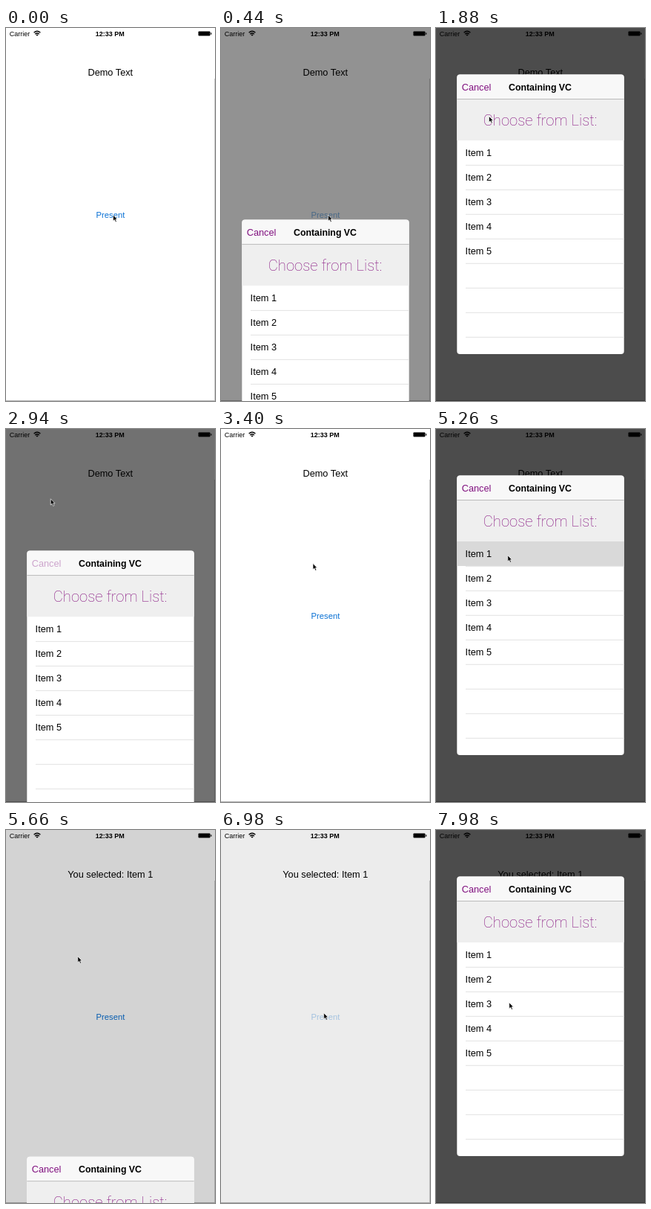
Recreate the animation shown at these times as an HTML page. Size 282 by 501 pixels, loop 8 s.

```html
<!DOCTYPE html>
<html>
<head>
<meta charset="utf-8">
<style>
html, body { margin: 0; width: 100%; height: 100%; overflow: hidden; background: #fff; }
svg { display: block; width: 100vw; height: 100vh; }
text { font: 12.75px "Liberation Sans", Arial, sans-serif; }
.mid { text-anchor: middle; }
.status { font-size: 9px; }
.bold { font-weight: bold; }
#present { font-size: 11.25px; fill: #0870d4; }
#cancel { fill: #80107f; }
.title { font-size: 12.35px; }
.prompt { font: 200 20.3px Roboto, Inter, sans-serif; fill: #85107f; }
</style>
</head>
<body>
<svg viewBox="0 0 282 501">
  <clipPath id="card"><rect x="28.3" y="62.5" width="225.4" height="375.5" rx="4"/></clipPath>
  <rect width="282" height="501" fill="#fff"/>
  <path d="M281.5 68V501" stroke="#ccc"/>
  <path d="M0 500.5H282" stroke="#b4b4b4"/>
  <text class="status" x="4.7" y="11">Carrier</text>
  <g fill="none" stroke="#000" stroke-width="1.3">
    <path d="M37.6 6.3Q42 2.3 46.4 6.3M39.2 8.2Q42 5.7 44.8 8.2"/>
    <path d="M40.4 9.2Q42 8 43.6 9.2L42 10.8Z" fill="#000" stroke="none"/>
  </g>
  <text class="status bold mid" x="140.3" y="11">12:33 PM</text>
  <rect x="259.5" y="4.5" width="16" height="6" rx="1"/>
  <rect x="276.2" y="6.2" width="1.2" height="2.6" rx=".5"/>
  <text id="label" class="mid" x="140.8" y="63.5"></text>
  <text id="present" class="mid" x="141" y="254.5">Present</text>
  <rect id="dim" width="282" height="501"/>
  <g id="modal">
    <g clip-path="url(#card)">
      <rect x="28" y="62" width="226" height="377" fill="#fff"/>
      <rect x="28" y="62" width="226" height="34" fill="#f8f8f8"/>
      <rect x="28" y="96" width="226" height="55" fill="#efefef"/>
      <path d="M28 95.5H254" stroke="#bbb"/>
      <rect id="row" x="28" y="151" width="226" height="33" fill="#d9d9d9"/>
      <g id="list"></g>
    </g>
    <text id="cancel" x="34.7" y="83.5">Cancel</text>
    <text class="title bold mid" x="140.5" y="83.5">Containing VC</text>
    <text class="prompt mid" x="140.5" y="130.7">Choose from List:</text>
  </g>
  <path id="cursor" d="M0 0V8.2L1.9 6.5L3.3 9.6L4.8 8.9L3.4 6H5.8Z" stroke="#fff" stroke-width=".7"/>
</svg>
<script>
const $ = id => document.getElementById(id);
const LOOP = 8000, SLIDE = 350, HEIGHT = 501, DIM = 0.7;
const shows = [240, 4226, 6910], hides = [2840, 5425];
const rowTap = 5240, cancelTap = 2700;

// Pointer stops: time, x, y
const stops = [
  [0, 144.5, 251], [1520, 144.5, 251], [1880, 71.5, 118.5], [2300, 49, 78.5],
  [2860, 49, 78.5], [3400, 124, 180.5], [3640, 130, 196], [4040, 146.3, 247.5],
  [4560, 146.3, 247.5], [5180, 96.8, 169.7], [5920, 96.8, 169.7], [6660, 138.7, 245.7],
  [7280, 138.7, 245.7], [7600, 116, 252], [7960, 98.7, 231.7], [8000, 98.7, 231.7]
];

let items = '';
for (let i = 0; i < 8; i++) {
  const y = 151 + 33 * i;
  if (i < 5) items += `<text x="39.6" y="${y + 21}">Item ${i + 1}</text>`;
  items += `<path d="M40 ${y + 33.3}H254" stroke="#e2e2e2"/>`;
}
$('list').innerHTML = items;

const clamp = v => Math.min(1, Math.max(0, v));
const ease = v => v * v * (3 - 2 * v);
const slide = (t, start) => ease(clamp((t - start) / SLIDE));
const sum = (t, starts) => starts.reduce((s, start) => s + slide(t, start), 0);

function pointer(t) {
  const i = stops.findIndex(s => s[0] > t);
  const [t0, x0, y0] = stops[i - 1], [t1, x1, y1] = stops[i];
  const k = (t - t0) / (t1 - t0);
  return [x0 + (x1 - x0) * k, y0 + (y1 - y0) * k];
}

// Buttons drop to 20% while held, then fade back
function buttonAlpha(t, press, release) {
  return t < press ? 1 : 0.2 + 0.8 * clamp((t - release) / 500);
}

function draw(t) {
  const shown = sum(t, shows) - sum(t, hides);
  $('dim').setAttribute('opacity', DIM * shown);
  $('modal').setAttribute('transform', `translate(0 ${HEIGHT * (1 - shown)})`);
  $('label').textContent = t < hides[1] ? 'Demo Text' : 'You selected: Item 1';
  $('present').setAttribute('opacity', Math.min(...shows.map(s => buttonAlpha(t, s - 200, s))));
  $('cancel').setAttribute('opacity', buttonAlpha(t, cancelTap, hides[0]));
  $('row').setAttribute('opacity', t >= rowTap && t < hides[1] + SLIDE ? 1 : 0);
  $('cursor').setAttribute('transform', `translate(${pointer(t)})`);
}

function tick() {
  draw(performance.now() % LOOP);
  requestAnimationFrame(tick);
}
tick();
</script>
</body>
</html>
```
